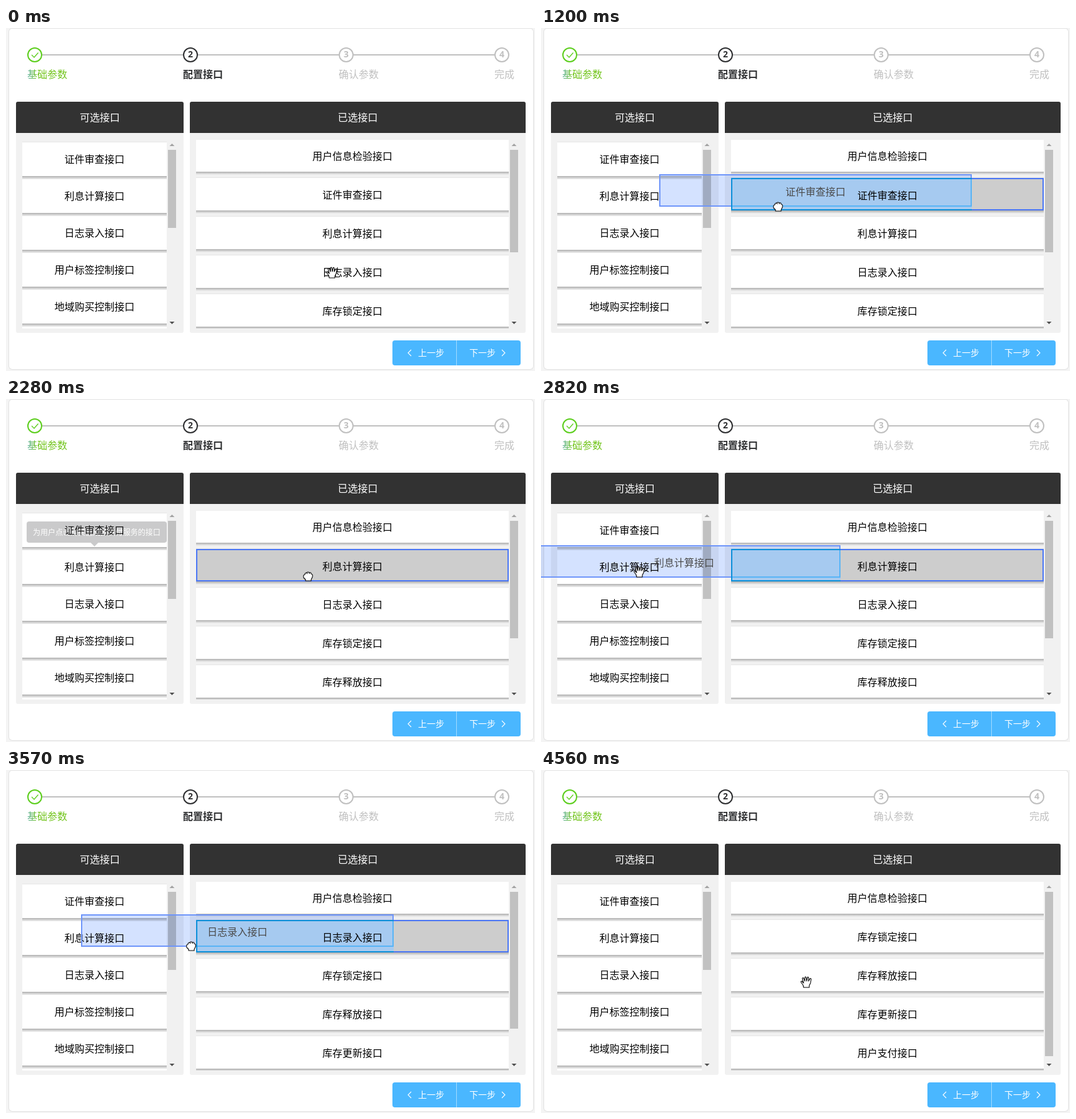
Recreate the animation shown at these times as an HTML page with a canvas. Size 846 by 549 pixels, loop 5280 ms.

```html
<!DOCTYPE html>
<html lang="zh-CN">
<head>
<meta charset="utf-8">
<style>
  html, body { margin: 0; width: 100%; height: 100%; overflow: hidden; }
  canvas { display: block; }
</style>
</head>
<body>
<canvas id="stage" width="846" height="549"></canvas>
<script>
const stage = document.getElementById('stage');
let ctx = stage.getContext('2d');
const LOOP = 5280, STEP = 30;
const CJK = '"Noto Sans CJK SC", "Noto Sans CJK", sans-serif';

const available = ['证件审查', '利息计算', '日志录入', '用户标签控制', '地域购买控制', ''];
const chosen = ['用户信息检验', '证件审查', '利息计算', '日志录入',
  '库存锁定', '库存释放', '库存更新', '用户支付'];
const thumbEnds = [359, 383, 414, 458];
const tipText = '为用户点击购买生成预支付服务的接口';

// Each drag: highlight, ghost and release times, grab point, tooltip times.
const drags = [
  { pick: 960, move: 1020, drop: 1770, grab: [494, 292], show: 1800, hide: 2130 },
  { pick: 2250, move: 2310, drop: 2970, grab: [482, 282], show: 3050, hide: 3245 },
  { pick: 3390, move: 3450, drop: 3870, grab: [480, 291], show: 3960, hide: 4240 }
];

// Cursor path: time, x, y
const path = [
  [0, 521, 391], [30, 508, 290], [900, 508, 290], [960, 494, 291], [1020, 494, 291],
  [1200, 379, 286], [1440, 233, 281], [1590, 157, 276], [1980, 157, 276],
  [2130, 450, 318], [2250, 484, 286], [2310, 482, 281], [2520, 260, 278],
  [2730, 157, 276], [3060, 157, 276], [3240, 420, 287], [3330, 474, 290],
  [3450, 480, 290], [3600, 250, 280], [3750, 160, 276], [4170, 160, 276],
  [4350, 330, 318], [4560, 424, 339]
];

const openHand = new Path2D('M-4 9L-5 5L-8 1Q-9-1-7-1L-4 2L-6-5Q-6-7-4-6L-2-1L-2-7Q-1-9 0-7' +
  'L1-1L2-7Q3-9 4-6L4-1L6-5Q8-6 8-4L7 2L5 6L5 9Z');
const fist = new Path2D('M-4 7L-4 5L-7 2Q-8-3-5-3Q-5-6-2-6Q0-8 2-6Q5-7 5-4Q8-4 7 1L5 5L5 7Z' +
  'M-2-6L-1-4M2-6L2-4');

function rect(x, y, w, h, color, radius = 0) {
  ctx.fillStyle = color;
  ctx.beginPath();
  ctx.roundRect(x, y, w, h, radius);
  ctx.fill();
}

function frame(x, y, w, h, color) {
  ctx.strokeStyle = color;
  ctx.lineWidth = 2;
  ctx.strokeRect(x + 1, y + 1, w - 2, h - 2);
}

function text(str, x, y, color, align = 'center', font = '16px ' + CJK) {
  ctx.font = font;
  ctx.textAlign = align;
  ctx.textBaseline = 'middle';
  ctx.fillStyle = color;
  ctx.fillText(str, x, y);
}

function line(points, color, width) {
  ctx.beginPath();
  points.forEach(([x, y]) => ctx.lineTo(x, y));
  ctx.strokeStyle = color;
  ctx.lineWidth = width;
  ctx.stroke();
}

function triangle(x, y, halfWidth, height, color) {
  ctx.fillStyle = color;
  ctx.beginPath();
  ctx.moveTo(x - halfWidth, y);
  ctx.lineTo(x + halfWidth, y);
  ctx.lineTo(x, y + height);
  ctx.fill();
}

function clipped(x, y, w, h, draw) {
  ctx.save();
  ctx.beginPath();
  ctx.rect(x, y, w, h);
  ctx.clip();
  draw();
  ctx.restore();
}

function card(x, y, w, h, name) {
  const bottom = y + h, shade = ctx.createLinearGradient(0, bottom, 0, bottom + 5);
  shade.addColorStop(0, 'rgba(0,0,0,.28)');
  shade.addColorStop(1, 'rgba(0,0,0,0)');
  rect(x, y - 1, w, 1, '#e6e6e6');
  rect(x, bottom, w, 5, shade);
  rect(x, y, w, h, '#fff');
  if (name) text(name + '接口', x + w / 2, y + 27, '#000');
}

function scrollbar(x, thumbEnd) {
  rect(x, 195, 13, thumbEnd - 195, '#c1c1c1');
  triangle(x + 6.5, 189, 4, -4, '#a3a3a3');
  triangle(x + 6.5, 470, 4, 4, '#505050');
}

function steps() {
  const ink = '#303133', idle = '#c0c0c0', green = '#5dce1e';
  const tint = ctx.createLinearGradient(34, 0, 50, 0);
  tint.addColorStop(0, '#5aaea0');
  tint.addColorStop(1, '#72c41c');
  ['基础参数', '配置接口', '确认参数', '完成'].forEach((title, i) => {
    const x = 46 + 249 * i, color = [green, ink, idle, idle][i];
    if (i < 3) rect(x + 12, 42, 225, 2, idle);
    ctx.beginPath();
    ctx.arc(x, 43, 11, 0, 7);
    ctx.strokeStyle = color;
    ctx.lineWidth = 2;
    ctx.stroke();
    if (i) text(i + 1, x, 43, color, 'center', 'bold 14px "Open Sans", sans-serif');
    else line([[41, 43], [45, 47], [51.5, 39.5]], green, 1.3);
    text(title, x - 12, 74, i ? color : tint, 'left', (i === 1 ? 'bold ' : '') + '16px ' + CJK);
  });
}

function panel(x, w, title) {
  rect(x, 118, w, 370, '#f1f1f1', 3);
  rect(x, 118, w, 50, '#323232', [3, 3, 0, 0]);
  text(title, x + w / 2, 143, '#fff');
}

function buttons() {
  rect(618, 500, 205, 40, '#4ab7ff', 4);
  rect(720, 500, 1, 40, '#a4dbff');
  text('上一步', 659, 520, '#fff', 'left', '14px ' + CJK);
  text('下一步', 741, 520, '#fff', 'left', '14px ' + CJK);
  line([[648, 515], [643, 520], [648, 525]], '#fff', 1.1);
  line([[793, 515], [798, 520], [793, 525]], '#fff', 1.1);
}

function lists(removed, active) {
  clipped(16, 180, 268, 301, () =>
    available.forEach((name, i) => card(26, 183 + 59 * i, 231, 54, name)));
  scrollbar(259, 320);
  const names = [chosen[0], ...chosen.slice(1 + removed)].slice(0, 5);
  clipped(294, 179, 537, 302, () => names.forEach((name, i) => {
    const y = 178 + 62 * i, lit = active && i === 1;
    card(304, y, 500, 52, lit ? '' : name);
    if (lit) {
      rect(304, y, 500, 52, '#cdcdcd');
      frame(304, y, 500, 52, '#4a76f5');
      text(name + '接口', 554, y + 28, '#000');
    }
  }));
  scrollbar(806, thumbEnds[removed]);
}

function ghost(x, y, name) {
  const right = x + 500;
  ctx.globalCompositeOperation = 'multiply';
  rect(x, y, 500, 52, '#d4e2ff');
  ctx.globalCompositeOperation = 'source-over';
  frame(x, y, 500, 52, '#6e95fa');
  // Overlap with the highlighted row takes a stronger blue.
  clipped(304, 240, right - 304, 52, () => {
    rect(304, 240, 500, 52, '#a6caf0');
    frame(x, y, 500, 52, '#58b4f6');
    frame(304, 240, 500, 52, '#0b8fd9');
    text(name + '接口', 554, 268, '#000');
  });
  text(name + '接口', x + 250, y + 28, '#4a4a4a');
}

// The tooltip fades as one layer, so it is drawn once on its own canvas.
function makeTooltip() {
  const layer = document.createElement('canvas');
  layer.width = 270;
  layer.height = 240;
  ctx = layer.getContext('2d');
  rect(33, 196, 224, 34, '#303133', 4);
  triangle(141.5, 230, 6, 6, '#303133');
  text(tipText, 43, 213, '#fff', 'left', '12px ' + CJK);
  ctx = stage.getContext('2d');
  return layer;
}
const tooltip = makeTooltip();

function cursorAt(t) {
  const next = path.findIndex(p => p[0] > t);
  if (next < 0) return path[path.length - 1].slice(1);
  const a = path[next - 1], b = path[next], k = (t - a[0]) / (b[0] - a[0]);
  return [a[1] + (b[1] - a[1]) * k, a[2] + (b[2] - a[2]) * k];
}

function cursor(x, y, shape) {
  ctx.save();
  ctx.translate(x, y);
  ctx.lineJoin = 'round';
  ctx.lineWidth = 1.1;
  ctx.fillStyle = '#fff';
  ctx.strokeStyle = '#000';
  ctx.fill(shape);
  ctx.stroke(shape);
  ctx.restore();
}

function render(now) {
  const t = Math.floor(now % LOOP / STEP) * STEP;
  const [x, y] = cursorAt(t).map(Math.round);
  const removed = drags.filter(d => t >= d.drop).length;
  const drag = drags[removed];
  const pressed = drag && t >= drag.pick - 60;

  rect(0, 0, 846, 549, '#f4f4f4');
  rect(4, 0, 840, 547, '#e2e2e2', 6);
  rect(5, 1, 838, 545, '#fff', 5);
  steps();
  panel(16, 268, '可选接口');
  panel(294, 537, '已选接口');
  buttons();
  lists(removed, drag && t >= drag.pick);
  if (drag && t >= drag.move) {
    ghost(304 + x - drag.grab[0], 240 + y - drag.grab[1], chosen[1 + removed]);
  }
  for (const d of drags) {
    const alpha = Math.min(1, (t - d.show) / 200, 1 - (t - d.hide) / 200);
    if (alpha <= 0) continue;
    ctx.globalAlpha = alpha;
    ctx.drawImage(tooltip, 0, 0);
    ctx.globalAlpha = 1;
  }
  cursor(x, y, pressed && x > 270 ? fist : openHand);
}

const start = performance.now();
function tick() {
  render(performance.now() - start);
  requestAnimationFrame(tick);
}
tick();
</script>
</body>
</html>
```
